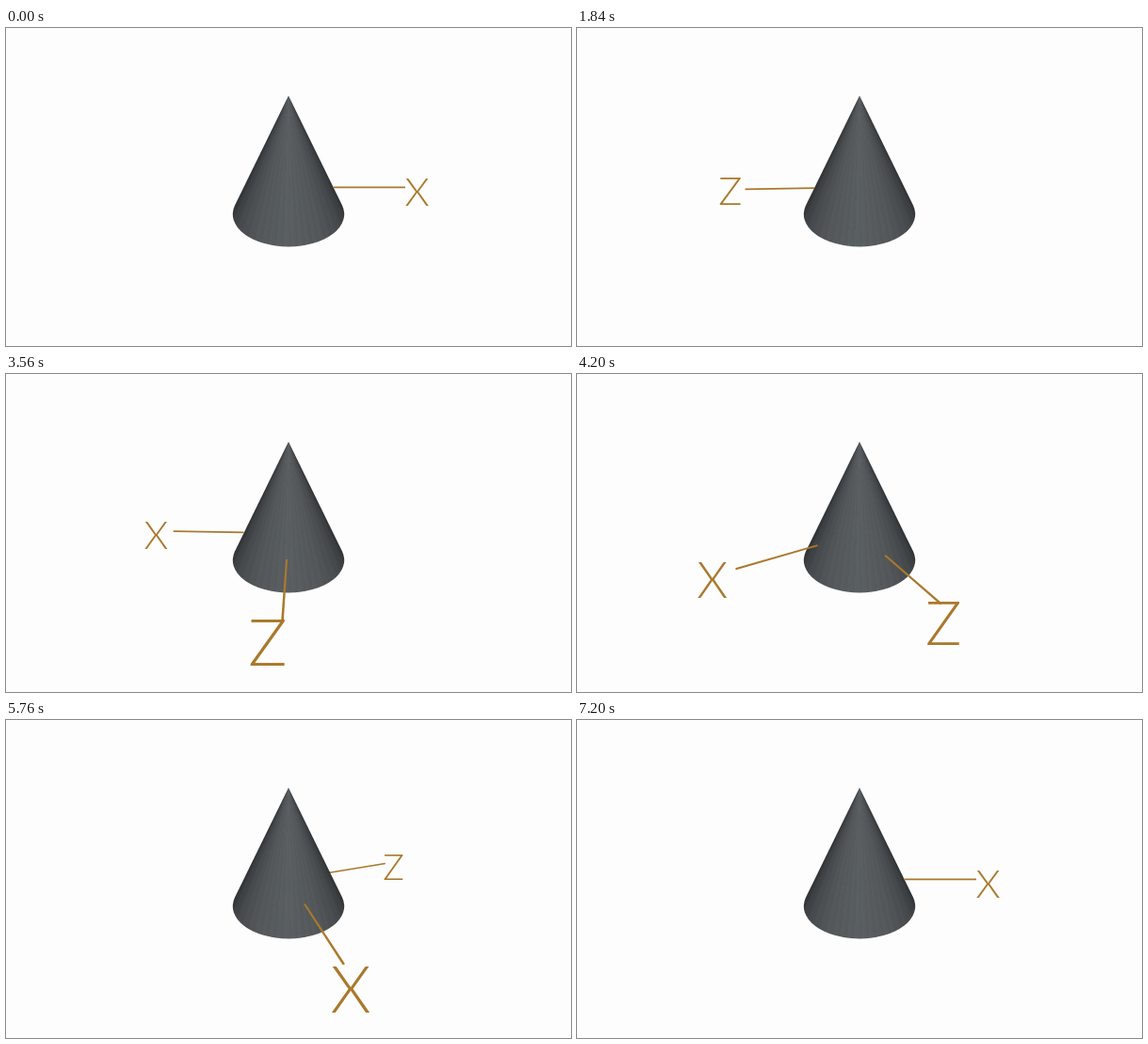
An HTML page without scripts for the animation above (7240 ms loop, 600 px wide and 338 px high).

```html
<!DOCTYPE html>
<html lang="en">
<head>
<meta charset="utf-8">
<title>Cone with turning axes</title>
<style>
@property --turn {
  syntax: "<angle>";
  inherits: true;
  initial-value: 0deg;
}
@keyframes turn {
  from { --turn: 0deg; }
  to { --turn: 360deg; }
}
html, body {
  margin: 0;
  width: 100%;
  height: 100%;
  overflow: hidden;
  background: #fdfdfe;
}
.stage {
  position: relative;
  isolation: isolate;
  width: 600px;
  height: 338px;
  overflow: hidden;
  animation: turn 7240ms steps(181, jump-none) infinite;
}
.cone, .axis, .line {
  position: absolute;
  inset: 0;
}
.cone {
  z-index: 0;
  clip-path: path("M300 72 L357 188.6 A59.2 34.5 0 1 1 243 188.6 Z");
  background:
    repeating-conic-gradient(from 151deg at 300px 72px,
      rgb(0 0 0 / .05) 0deg, rgb(0 0 0 / 0) 2.8deg),
    conic-gradient(from 150deg at 300px 72px,
      #303336 4deg, #3d4043 6deg, #494d50 10deg, #55595c 17deg,
      #5c6164 30deg,
      #55595c 43deg, #494d50 50deg, #3d4043 54deg, #303336 56deg);
}

/* Camera tilt is 30deg: depth shows as half height on screen.
   --len: axis length, --far: radius of the label,
   both in pixels at the centre; .00296 is the perspective per pixel. */
.axis {
  --c: cos(var(--dir));
  --s: sin(var(--dir));
  --near: calc(1 / (1 + .141 * var(--s)));
  --tip: calc(1 / (1 + .00296 * var(--len) * var(--s)));
  z-index: calc(1000 * (.104 - var(--s)));
}
.x {
  --dir: var(--turn);
  --aim: var(--turn);
  --len: 124;
  --far: 139.6;
  --dx: -3;
  --dy: 5;
}
.z {
  --dir: calc(var(--turn) + 90deg);
  --aim: calc(var(--turn) + 88deg);
  --len: 120;
  --far: 133;
  --dx: -4.2;
  --dy: 4.3;
}
.line {
  --x0: calc(300 + 47.7 * var(--c) * var(--near));
  --y0: calc(169.3 - 23.85 * var(--s) * var(--near));
  --x1: calc(300 + var(--len) * var(--c) * var(--tip));
  --y1: calc(169.3 - var(--len) * .5 * var(--s) * var(--tip));
  /* half the line weight, across the line */
  --w: calc(.86 / hypot(var(--c), .5 * var(--s)));
  --nx: calc(.5 * var(--s) * var(--w));
  --ny: calc(var(--c) * var(--w));
  background: #a9792c;
  clip-path: polygon(
    calc(1px * (var(--x0) + var(--nx) * var(--near))) calc(1px * (var(--y0) + var(--ny) * var(--near))),
    calc(1px * (var(--x1) + var(--nx) * var(--tip))) calc(1px * (var(--y1) + var(--ny) * var(--tip))),
    calc(1px * (var(--x1) - var(--nx) * var(--tip))) calc(1px * (var(--y1) - var(--ny) * var(--tip))),
    calc(1px * (var(--x0) - var(--nx) * var(--near))) calc(1px * (var(--y0) - var(--ny) * var(--near))));
}
.label {
  --k: calc(1 / (1 + .00296 * var(--far) * sin(var(--aim))));
  --lx: calc(300 + var(--k) * (var(--far) * cos(var(--aim)) + var(--dx)));
  --ly: calc(169 + var(--k) * (var(--dy) - .5 * var(--far) * sin(var(--aim))));
  position: absolute;
  left: 0;
  top: 0;
  font: 300 42px/1 Lato, "Open Sans", sans-serif;
  color: #a9792c;
  transform-origin: 0 0;
  transform:
    translate(calc(1px * var(--lx)), calc(1px * var(--ly)))
    scale(var(--k))
    translate(-50%, -53%);
}
</style>
</head>
<body>
<div class="stage">
  <div class="axis x"><div class="line"></div><div class="label">X</div></div>
  <div class="axis z"><div class="line"></div><div class="label">Z</div></div>
  <div class="cone"></div>
</div>
</body>
</html>
```
